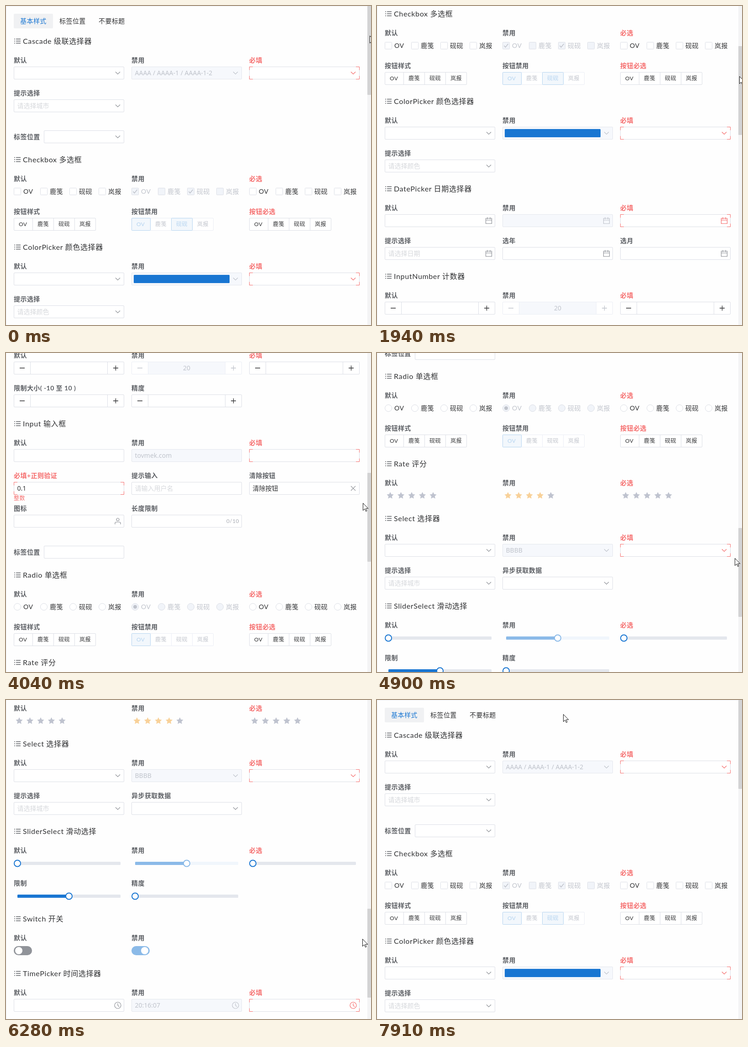
These frames come from a looping animation (800 by 700 pixels, 8 s). An HTML page:

```html
<!DOCTYPE html>
<html lang="zh-CN">
<head>
<meta charset="utf-8">
<style>
  html, body { margin: 0; width: 100%; height: 100%; overflow: hidden; background: #fefefe; }
  svg { display: block; }
  text { font-family: Lato, "Noto Sans CJK SC", "Noto Sans CJK", sans-serif; letter-spacing: .45px; white-space: pre; }
  .title { letter-spacing: .65px; }
  .value { font-family: "Noto Sans", "Noto Sans CJK SC", "Noto Sans CJK", sans-serif; letter-spacing: 0; }
</style>
</head>
<body>
<svg width="800" height="700" viewBox="0 0 800 700">
  <g id="page"></g>
  <rect x="792" width="8" height="700" fill="#f4f4f5"/>
  <rect id="thumb" x="792" width="8" height="195" rx="1" fill="#d3d3d4"/>
  <path id="cursor" d="M.5 .5V16.5L4.2 13L6.7 18.5L9 17.5L6.6 12.2H11.8Z" fill="#fff" stroke="#111"/>
</svg>
<script>
const RED = '#f56c6c', BLUE = '#1976d2', PALE_BLUE = '#8bbae8', INK = '#303133',
      GREY = '#909399', FAINT = '#c0c4cc', LINE = '#dcdfe6', SOFT = '#f6f8fc', HINT = '#d6d8dc';
const COLUMNS = [17, 275, 533], WIDTH = 242;
const CHOICES = ['OV', '鹿笺', '砚砚', '岚报'];
let out = '';

// Drawing helpers; y is always the vertical centre of a part.
const rect = (x, y, w, h, fill, stroke = 'none', r = 1.5) => {
  const d = stroke === 'none' ? 0 : .5;
  out += `<rect x="${x + d}" y="${y - h / 2 + d}" width="${w - 2 * d}" height="${h - 2 * d}" rx="${r}" fill="${fill}" stroke="${stroke}"/>`;
};
const path = (x, y, d, stroke, width = 1.2, fill = 'none') => {
  out += `<path transform="translate(${x} ${y})" d="${d}" fill="${fill}" stroke="${stroke}" stroke-width="${width}"/>`;
};
const circle = (x, y, r, fill, stroke = 'none', width = 1) => {
  out += `<circle cx="${x}" cy="${y}" r="${r}" fill="${fill}" stroke="${stroke}" stroke-width="${width}"/>`;
};
const text = (x, y, str, fill = INK, size = 14, extra = '') => {
  out += `<text x="${x}" y="${y + size * .36}" font-size="${size}" fill="${fill}" ${extra}>${str}</text>`;
};
const value = (x, y, str, fill, extra = '') => text(x, y, str, fill, 14, 'class="value" ' + extra);
const label = (x, y, str, fill = '#5c5f64') => text(x, y, str, fill, 14, 'font-weight="700"');

const ICONS = {
  chevron: 'M-5 -2.5L0 2.5L5 -2.5',
  calendar: 'M-6.5 -5H6.5V6.5H-6.5ZM-6.5 -1H6.5M-3 -7.5V-3M3 -7.5V-3',
  clock: 'M-7 0A7 7 0 1 1 7 0A7 7 0 1 1 -7 0M0 -4.5V0L3 3',
  user: 'M-3 -3.5A3 3 0 1 1 3 -3.5A3 3 0 1 1 -3 -3.5M-6 7V4.5Q-6 2 -3.5 2H3.5Q6 2 6 4.5V7',
  close: 'M-5 -5L5 5M5 -5L-5 5',
};
const CORNERS = 'M.5 -6.5V-13.5H8M.5 6.5V13.5H8M234 -13.5H241.5V-6.5M234 13.5H241.5V6.5';
const iconColor = tone => ({ off: FAINT, must: RED })[tone] || GREY;

// Each control is a function of (x, y, tone); tone is '', 'off' or 'must'.
const field = (icon, str = '', color) => (x, y, tone) => {
  rect(x, y, WIDTH, 28, tone === 'off' ? SOFT : '#fff', tone === 'off' ? '#e4e7ed' : LINE);
  if (tone === 'must') path(x, y, CORNERS, RED, 1);
  if (icon) path(x + 228, y, ICONS[icon], iconColor(tone));
  if (str) value(x + 7.5, y, str, color || (tone === 'off' ? FAINT : HINT));
};
const swatch = (x, y, tone) => {
  field('chevron')(x, y, tone);
  rect(x + 5, y, 210, 18, BLUE);
};
const choices = (round, checked = []) => (x, y, tone) => CHOICES.forEach((name, i) => {
  const left = x + (i && 64 * i - 6), off = tone === 'off', fill = off ? '#f1f4f9' : '#fff';
  if (round) circle(left + 8, y, 7.5, fill, LINE);
  else rect(left, y, 16, 16, fill, LINE, 1);
  if (off && checked.includes(i)) {
    if (round) circle(left + 8, y, 4, FAINT);
    else path(left + 8, y, 'M-4.5 0L-1.5 3.5L4.5 -4', FAINT, 1.6);
  }
  text(left + 21, y, name, off ? FAINT : INK);
});
const buttons = (active = []) => (x, y, tone) => {
  const off = tone === 'off', line = off ? '#ebeef5' : LINE, left = i => x + (i && 46 * i - 5);
  rect(x, y, 180, 28, '#fff', line);
  for (let i = 1; i < CHOICES.length; i++) path(left(i) + .5, y, 'M0 -13.5V13.5', line, 1);
  CHOICES.forEach((name, i) => {
    const on = off && active.includes(i);
    if (on) rect(left(i), y, i ? 47 : 42, 28, '#f2f7fc', '#b5d4f0', 1);
    text(left(i) + 11, y, name, on ? '#b5d4f0' : off ? FAINT : INK, 12);
  });
};
const counter = (x, y, tone) => {
  const off = tone === 'off', line = off ? '#ebeef5' : LINE, ink = off ? FAINT : INK;
  rect(x, y, WIDTH, 28, '#fff', line);
  rect(x + 36, y, 170, 28, off ? SOFT : '#fff', line, 0);
  path(x + 18.5, y, 'M-5.5 0H5.5M199.5 0H210.5M205 -5.5V5.5', ink, 1.3);
  if (off) value(x + 121, y, '20', FAINT, 'text-anchor="middle"');
};
const limited = (x, y, tone) => {
  field()(x, y, tone);
  text(x + 236, y, '0/10', '#a9adb5', 12, 'text-anchor="end"');
};
const STAR = 'M' + Array.from({ length: 10 }, (_, i) => {
  const r = i % 2 ? 3.9 : 8, a = i * Math.PI / 5;
  return (r * Math.sin(a)).toFixed(2) + ' ' + (-r * Math.cos(a)).toFixed(2);
}).join('L') + 'Z';
const stars = (x, y, tone) => {
  for (let i = 0; i < 5; i++)
    path(x + 12 + 23.5 * i, y, STAR, 'none', 0, tone === 'off' && i < 4 ? '#f8d199' : '#bfc3cf');
};
const slider = (amount = 0) => (x, y, tone) => {
  const off = tone === 'off', color = off ? PALE_BLUE : BLUE, mid = y + .5;
  rect(x + 8, mid, 226, 7, off ? '#f1f6fc' : '#e4e7ed');
  if (amount) rect(x + 8, mid, amount, 7, color);
  circle(x + 8 + amount, mid, 7, '#fff', color, 2);
};
const toggle = (x, y, tone) => {
  const on = tone === 'off';
  rect(x, y, 40, 20, on ? PALE_BLUE : GREY, 'none', 10);
  circle(x + (on ? 29 : 11), y, 8, '#fff');
};

// A section is a heading followed by rows of [caption, control] cells.
function section(y, title, ...rows) {
  path(18, y, 'M0 -4.5H2M4 -4.5H14M0 0H2M4 0H14M0 4.5H2M4 4.5H14', '#5c5f64', 1.4);
  text(37, y, title, INK, 16, 'class="title"');
  rows.forEach((cells, r) => cells.forEach(([caption, control], c) => {
    const tone = /禁用/.test(caption) ? 'off' : /必/.test(caption) ? 'must' : '';
    const top = y + 42 + 72 * r;
    label(COLUMNS[c], top, caption, tone === 'must' ? RED : undefined);
    control(COLUMNS[c], top + 28, tone);
  }));
}
const trio = (a, b = a, c = a, last = '必填') => [['默认', a], ['禁用', b], [last, c]];
const buttonRow = active => [['按钮样式', buttons()], ['按钮禁用', buttons(active)], ['按钮必选', buttons()]];
function inlineField(y, icon) {
  label(17, y, '标签位置');
  rect(83, y, 176, 28, '#fff', LINE);
  if (icon) path(245, y, ICONS[icon], GREY);
}

path(0, 0, 'M.5 2600V.5H792', '#f0f1f6', 1);
rect(17, 33, 86, 32, '#f0f1f3', 'none', 2);
['基本样式', '标签位置', '不要标题'].forEach((tab, i) => text(31 + 86 * i, 33, tab, i ? INK : BLUE));

const drop = field('chevron'), date = field('calendar'), time = field('clock');
section(77, 'Cascade 级联选择器',
  trio(drop, field('chevron', 'AAAA / AAAA-1 / AAAA-1-2')),
  [['提示选择', field('chevron', '请选择城市')]]);
inlineField(287, 'chevron');
section(337, 'Checkbox 多选框', trio(choices(false, [0, 2]), undefined, undefined, '必选'), buttonRow([0, 2]));
section(529, 'ColorPicker 颜色选择器', trio(drop, swatch), [['提示选择', field('chevron', '请选择颜色')]]);
section(721, 'DatePicker 日期选择器', trio(date),
  [['提示选择', field('calendar', '请选择日期')], ['选年', date], ['选月', date]]);
section(913, 'InputNumber 计数器', trio(counter), [['限制大小( -10 至 10 )', counter], ['精度', counter]]);
section(1105, 'Input 输入框', trio(field(), field('', 'tovmek.com')),
  [['必填+正则验证', field('', '0.1', INK)], ['提示输入', field('', '请输入用户名')], ['清除按钮', field('close', '清除按钮', INK)]],
  [['图标', field('user')], ['长度限制', limited]]);
text(17, 1269, '整数', RED, 12);
inlineField(1387);
section(1437, 'Radio 单选框', trio(choices(true, [0]), undefined, undefined, '必选'), buttonRow([0]));
section(1629, 'Rate 评分', trio(stars, stars, stars, '必选'));
section(1749, 'Select 选择器', trio(drop, field('chevron', 'BBBB')),
  [['提示选择', field('chevron', '请选择城市')], ['异步获取数据', drop]]);
section(1941, 'SliderSelect 滑动选择', trio(slider(), slider(113), slider(), '必选'),
  [['限制', slider(113)], ['精度', slider()]]);
section(2133, 'Switch 开关', [['默认', toggle], ['禁用', toggle]]);
section(2253, 'TimePicker 时间选择器', trio(time, field('clock', '20:16:07')));

const page = document.getElementById('page'), thumb = document.getElementById('thumb'),
      cursor = document.getElementById('cursor');
page.innerHTML = out;

// Stepped drags: start, end, steps, scroll, cursor x, cursor y relative to the thumb.
const LOOP = 8000, GRAB = 66, THUMB_RATIO = .2771;
const DRAGS = [
  [1230, 1550, 5, 300, 795, GRAB], [1940, 1940, 1, 320, 794, GRAB], [2010, 2080, 2, 350, 793, GRAB],
  [2700, 3010, 5, 763, 783, GRAB], [3490, 3800, 5, 935, 782, GRAB], [4040, 4040, 1, 950, 782, GRAB],
  [4110, 4430, 5, 1130, 783, GRAB], [4580, 4900, 5, 1386, 784, GRAB], [4950, 5050, 2, 1430, 784, GRAB],
  [5190, 5430, 4, 1520, 783, GRAB], [5660, 6100, 6, 1648, 781, GRAB], [6280, 6280, 1, 1653, 781, GRAB],
  [6360, 6430, 2, 1660, 781, GRAB], [6600, 6600, 1, 1656, 781, GRAB],
  [6930, 7530, 9, 0, 706, 34], [7860, 7910, 2, 0, 408, 31],
];
function pose(t) {
  let now = [0, 797, GRAB - 1];
  for (const [start, end, steps, ...goal] of DRAGS) {
    if (t < start) break;
    const step = steps > 1 ? Math.floor((t - start) / (end - start) * (steps - 1) + 1e-6) + 1 : 1;
    const k = Math.min(1, step / steps);
    now = now.map((v, i) => v + (goal[i] - v) * k);
  }
  return now;
}
function draw() {
  const [scroll, x, grab] = pose(performance.now() % LOOP).map(Math.round);
  const top = Math.floor(scroll * THUMB_RATIO);
  page.setAttribute('transform', `translate(0 ${-scroll})`);
  thumb.setAttribute('y', top);
  cursor.setAttribute('transform', `translate(${x} ${top + grab})`);
  requestAnimationFrame(draw);
}
draw();
</script>
</body>
</html>
```
